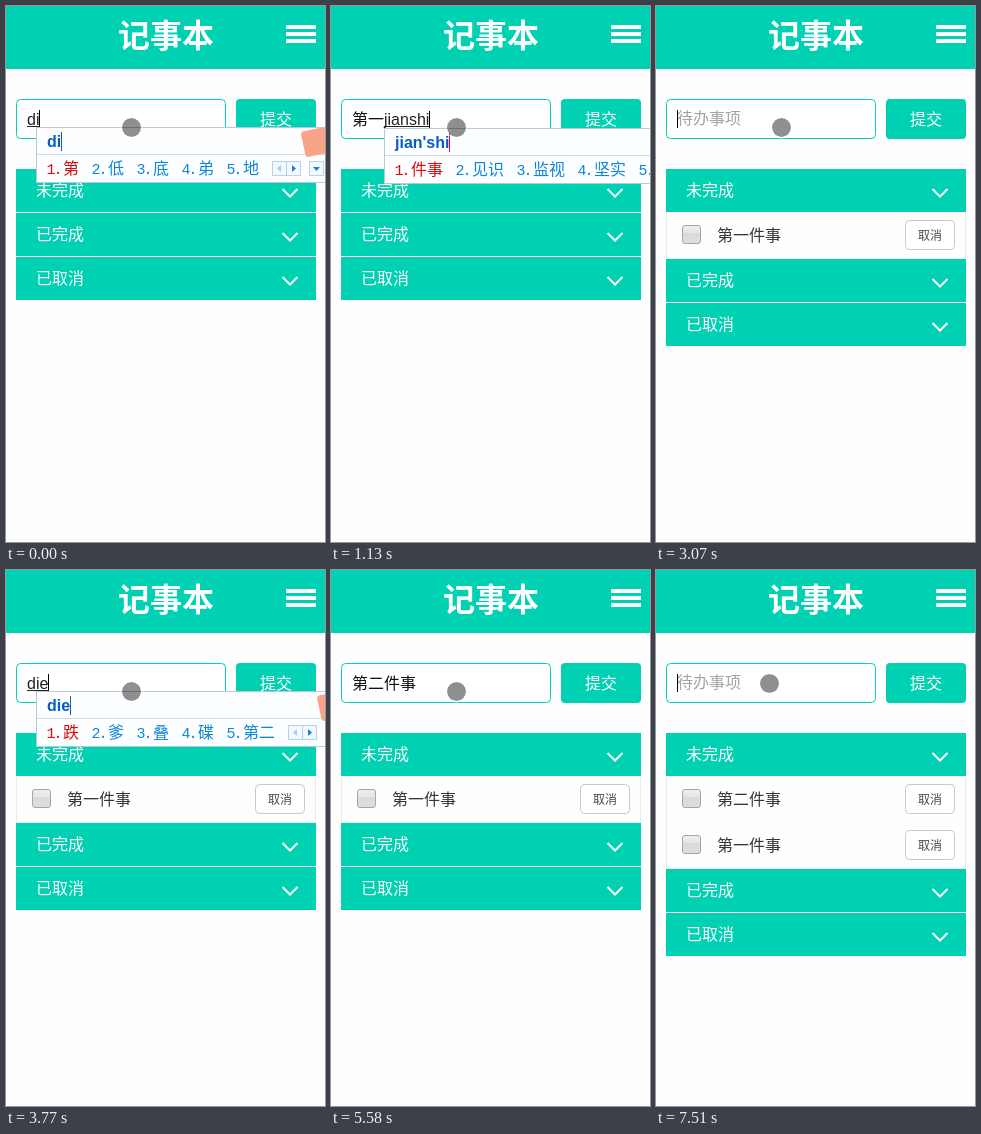
An HTML page for the animation above (8 s loop, 319 by 536 pixels).

```html
<!DOCTYPE html>
<html lang="zh-CN">
<head>
<meta charset="utf-8">
<title>记事本</title>
<style>
  html, body { margin: 0; width: 100%; height: 100%; overflow: hidden; background: #fefefe; }
  svg { display: block; width: 100vw; height: 100vh; }
  text { font: 16px "Liberation Sans", "Noto Sans CJK SC", "Noto Sans CJK", sans-serif; white-space: pre; }
  .num { font: 15px "Liberation Mono", monospace; }
</style>
</head>
<body>
<svg id="stage" viewBox="0 0 319 536">
  <defs>
    <linearGradient id="box" x2="0" y2="1">
      <stop offset="0" stop-color="#eee"/><stop offset=".4" stop-color="#e6e6e6"/>
      <stop offset=".42" stop-color="#dadada"/><stop offset="1" stop-color="#dedede"/>
    </linearGradient>
  </defs>
  <g id="scene"></g>
</svg>
<script>
const LOOP = 8000, GREEN = '#00d1b2', HOVER = '#1ac0a6';
const scene = document.getElementById('scene');
const ruler = document.createElement('canvas').getContext('2d');

// time, committed text, pinyin being typed, candidates
const typing = [
  [0, '', 'di', '第 低 底 弟 地'],
  [150, '', "di'yi", '第一 第一次 敌意 地衣 第'],
  [460, '第一'],
  [740, '第一', 'j', '就 将 及 家 今'],
  [890, '第一', 'ji', '集 季 急 几 鸡'],
  [1010, '第一', 'jian', '件 见 间 建 减'],
  [1130, '第一', "jian'shi", '件事 见识 监视 坚实 减势'],
  [1280, '第一件事'],
  [2110, ''],
  [3190, '', 'd', '的 都 大 到 对'],
  [3340, '', 'di', '第 低 底 弟 地'],
  [3770, '', 'die', '跌 爹 叠 碟 第二'],
  [3890, '', "di'er", '第二 第二个 第二天 第二次 第'],
  [4170, '第二'],
  [4450, '第二', 'ji', '集 季 急 几 鸡'],
  [4570, '第二', 'jia', '家 加 价 假 佳'],
  [4690, '第二', 'jian', '件 见 间 建 减'],
  [4810, '第二', "jian's", '件事 减少 见识 监视 坚实'],
  [4930, '第二', "jian'shi", '件事 见识 监视 坚实 减势'],
  [5050, '第二件事'],
  [6520, '']
];
const caretTimes = [[0, 1], [1840, 0], [2110, 1], [2640, 0], [3070, 1], [5580, 0], [6100, 1], [6520, 0], [7360, 1]];
const pointerPath = [
  [0, 125.5, 121.5], [5980, 160, 112], [6100, 205, 109], [6220, 243.5, 118.5], [6370, 252.5, 121.5],
  [6820, 187.5, 128.5], [6970, 151, 125.5], [7090, 125.5, 119.5], [7240, 116, 114.5], [7360, 113.5, 113.5]
];

const at = (list, t) => list.findLast(entry => entry[0] <= t).slice(1);
const rect = (x, y, w, h, fill, more = '') =>
  `<rect x="${x}" y="${y}" width="${w}" height="${h}" fill="${fill}" ${more}/>`;
const frame = (x, y, w, h, fill, line, r = 0) =>
  rect(x + .5, y + .5, w - 1, h - 1, fill, `stroke="${line}" rx="${r}"`);
const text = (x, y, s, fill, more = '') => `<text x="${x}" y="${y}" fill="${fill}" ${more}>${s}</text>`;
const path = (d, fill, more = '') => `<path d="${d}" fill="${fill}" ${more}/>`;
const width = (s, weight = '') => {
  ruler.font = weight + ' 16px "Liberation Sans", "Noto Sans CJK SC", "Noto Sans CJK", sans-serif';
  return ruler.measureText(s).width;
};

function header() {
  return rect(0, 0, 319, 63, GREEN) +
    text(160, 41, '记事本', '#fff', 'text-anchor="middle" style="font-size:32px;font-weight:bold"') +
    [19, 26, 33].map(y => rect(280, y, 30, 4, '#fff')).join('');
}

function form(t, done, pinyin) {
  const blurred = t >= 6520 && t < 7360;
  const hovered = t >= 6520 && t < 7360;
  const typed = pinyin.replace("'", '');
  const start = 21 + 16 * done.length, end = start + width(typed);
  let s = frame(10, 93, 210, 40, '#fff', blurred ? HOVER : GREEN, 4) +
    rect(230, 93, 80, 40, hovered ? HOVER : GREEN, 'rx="4"') +
    text(254, 119, '提交', '#fff');
  if (done + typed) s += text(21, 119, done, '#111') + text(start, 119, typed, '#222');
  else s += text(21, 118, '待办事项', '#a4a4a4');
  if (typed) s += rect(start, 120, end - start, 1, '#222');
  if (at(caretTimes, t)[0]) {
    const top = done ? 105 : 104;
    s += rect(Math.floor(end), top, 1, 122 - top, '#000');
  }
  return s;
}

function section(y, title) {
  return rect(10, y, 300, 43, GREEN) + text(30, y + 27, title, '#fff') +
    path(`M276.5 ${y + 20}l7.5 7.5l7.5 -7.5`, 'none', 'stroke="#fff" stroke-width="2"');
}

function item(y, title) {
  return rect(10, y, 300, 47, '#ebebeb') + rect(11, y, 298, 46, '#fefefe') +
    frame(26, y + 13, 19, 19, 'url(#box)', '#a6a6a6', 2.5) +
    text(61, y + 29, title, '#363636') +
    frame(249, y + 8, 50, 30, '#fff', '#c3cad6', 4) +
    text(262, y + 27.5, '取消', '#4a4a4a', 'style="font-size:12px"');
}

function lists(t) {
  const items = t < 2110 ? [] : t < 6520 ? ['第一件事'] : ['第二件事', '第一件事'];
  const below = 207 + 46 * items.length;
  return section(163, '未完成') + items.map((name, i) => item(206 + 46 * i, name)).join('') +
    section(below, '已完成') + section(below + 44, '已取消');
}

function inputPanel(done, pinyin, candidates) {
  const x = done ? 53 : 30, y = done ? 122 : 121;
  let s = frame(x, y, 400, 56, '#fdfeff', '#b9c9dc') +
    rect(x + 1, y + 27, 398, 1, '#d3dbe4') +
    text(x + 11, y + 20, pinyin, '#0a5cc4', 'style="font-weight:bold"') +
    rect(Math.floor(x + 11 + width(pinyin, 'bold')), y + 5, 1, 19, done ? '#e01010' : '#2458a8');
  let cx = x + 11;
  candidates.split(' ').forEach((word, i) => {
    const color = i ? '#0f86d8' : '#d80c0c';
    s += text(cx - .5, y + 47, i + 1, color, 'class="num"') +
      text(cx + 6.5, y + 47, '.', color, 'class="num"') + text(cx + 16, y + 47, word, color);
    cx += 29 + 16 * word.length;
  });
  const by = y + 34;
  s += [0, 14, 37].map(dx => frame(cx + dx, by, 15, 15, '#f3f9fe', '#b5d3ec')).join('') +
    path(`M${cx + 9} ${by + 4}v7l-4 -3.5z`, '#a9cbe6') +
    path(`M${cx + 20} ${by + 4}v7l4 -3.5z`, '#1e80d0') +
    path(`M${cx + 41} ${by + 6}h7l-3.5 4z`, '#1e80d0');
  const lx = cx + 44, ly = y + 15;
  return s + rect(lx - 13, ly - 13, 26, 26, '#f7a488', `rx="3" transform="rotate(-12 ${lx} ${ly})"`);
}

function pointer(t) {
  const [x, y] = at(pointerPath, t);
  return `<circle cx="${x}" cy="${y}" r="9.5" fill="#000" fill-opacity=".44"/>` +
    `<circle cx="${x}" cy="${y}" r="10.4" fill="none" stroke="#fff" stroke-width="1.8" stroke-opacity=".4"/>`;
}

let shown = '';
function draw(now) {
  const t = now % LOOP;
  const [done, pinyin = '', candidates] = at(typing, t);
  const next = header() + form(t, done, pinyin) + lists(t) +
    (pinyin && inputPanel(done, pinyin, candidates)) + pointer(t);
  if (next !== shown) scene.innerHTML = shown = next;
  requestAnimationFrame(draw);
}
draw(0);
</script>
</body>
</html>
```
